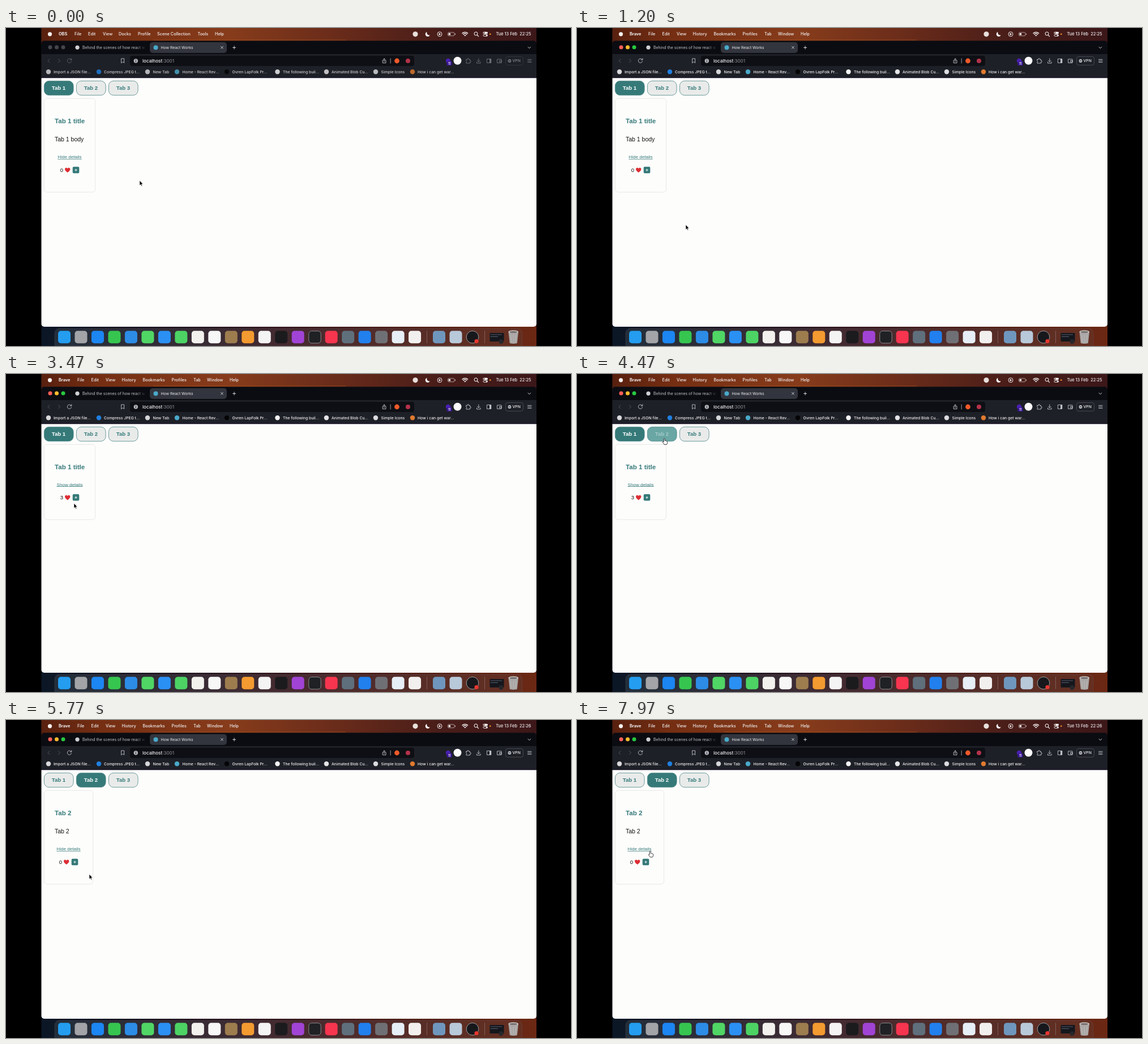
Write an HTML page that moves like this. It is 998 px wide and 561 px high and loops after 8000 ms.

```html
<!DOCTYPE html>
<html lang="en">
<head>
<meta charset="utf-8">
<title>How React Works</title>
<style>
  html, body { margin: 0; width: 100%; height: 100%; overflow: hidden; background: #000; }
  svg { display: block; width: 100vw; height: 100vh; }
  text { font-family: Inter, sans-serif; fill: #f1f1f3; white-space: pre; }
  .page text { font-family: "Liberation Sans", Arial, sans-serif; }
  .line { fill: none; stroke: #c3c5cc; stroke-width: .9; stroke-linecap: round; stroke-linejoin: round; }
</style>
</head>
<body>
<svg id="stage" viewBox="0 0 998 561">
  <defs>
    <linearGradient id="menuTint">
      <stop offset="0" stop-color="#58200f"/><stop offset=".12" stop-color="#752e12"/>
      <stop offset=".38" stop-color="#873c1b"/><stop offset=".6" stop-color="#692b1a"/>
      <stop offset=".8" stop-color="#491d19"/><stop offset="1" stop-color="#3c1719"/>
    </linearGradient>
    <linearGradient id="floorTint">
      <stop offset="0" stop-color="#0b1726"/><stop offset=".5" stop-color="#371a20"/>
      <stop offset="1" stop-color="#6c2813"/>
    </linearGradient>
    <linearGradient id="dockTint">
      <stop offset="0" stop-color="#222e3b"/><stop offset=".5" stop-color="#452a30"/>
      <stop offset="1" stop-color="#652f20"/>
    </linearGradient>
    <linearGradient id="tabFade">
      <stop offset="0" stop-color="#0b0c11" stop-opacity="0"/><stop offset="1" stop-color="#0b0c11"/>
    </linearGradient>
    <clipPath id="tabClip"><rect x="120" y="25" width="126" height="19"/></clipPath>
  </defs>
  <g id="desktop"></g>
  <g id="menu"></g>
  <g id="chrome"></g>
  <g id="page" class="page"></g>
  <g id="dock"></g>
  <g id="cursor"></g>
</svg>
<script>
const LOOP = 8000;
const TEAL = '#357a79';
const el = id => document.getElementById(id);

const rect = (x, y, w, h, fill, r = 0, extra = '') =>
  `<rect x="${x}" y="${y}" width="${w}" height="${h}" rx="${r}" fill="${fill}" ${extra}/>`;
const disc = (x, y, r, fill, extra = '') => `<circle cx="${x}" cy="${y}" r="${r}" fill="${fill}" ${extra}/>`;
const label = (x, y, size, str, extra = '') => `<text x="${x}" y="${y}" font-size="${size}" ${extra}>${str}</text>`;
const line = (d, extra = '') => `<path class="line" d="${d}" ${extra}/>`;

// Desktop, menu bar status icons and window body
el('desktop').innerHTML =
  rect(62.5, 0, 874.5, 561, 'url(#floorTint)') +
  rect(62.5, 0, 874.5, 30, 'url(#menuTint)') +
  rect(260, 20.6, 340, 1, '#a8571f', 0, 'opacity=".6"') +
  rect(62.5, 22.5, 874.5, 504.5, '#0b0c11', 5) +
  rect(62.5, 46, 874.5, 42, '#1e2027') +
  rect(62.5, 87, 874.5, 1.4, '#170f25') +
  '<path d="M62.5 88.3H937V522a5 5 0 0 1-5 5H67.5a5 5 0 0 1-5-5Z" fill="#fdfdfc"/>' +
  disc(77.5, 10.8, 3.6, '#f4f0ee') +
  disc(723, 10.8, 4.6, '#e8dfdc') +
  '<path d="M743.5 6.8a4.2 4.2 0 1 0 5.3 5.6a4.2 4.2 0 0 1-5.3-5.6Z" fill="#fff"/>' +
  disc(766, 10.8, 4, 'none', 'stroke="#fff" stroke-width=".9"') +
  '<path d="M764.7 8.7v4.2l3.5-2.1Z" fill="#fff"/>' +
  rect(780.5, 7.8, 11.5, 6, 'none', 1.8, 'stroke="#c9b9b6" stroke-width=".8"') +
  rect(781.7, 9, 3.4, 3.6, '#fff', .8) + rect(793, 9.6, 1, 2.4, '#c9b9b6') +
  line('M806 9.3a7 7 0 0 1 9.6 0M807.7 11.2a4.6 4.6 0 0 1 6.2 0M809.8 13.2h2', 'style="stroke:#fff;stroke-width:1.4"') +
  line('M832.3 12.3l2.3 2.5', 'style="stroke:#fff;stroke-width:1.1"') +
  disc(830, 10, 3, 'none', 'stroke="#fff"') +
  rect(842.5, 6.8, 8.5, 3.6, '#fff', 1.8) + disc(844.5, 8.6, 1.1, '#562118') +
  rect(842.9, 11.5, 7.7, 3, 'none', 1.5, 'stroke="#fff" stroke-width=".8"') + disc(849, 13, 1.1, '#fff') +
  disc(855.3, 10.8, 1.3, '#ff9a2c');

const MENUS = {
  OBS: [['OBS', 93], ['File', 121], ['Edit', 145], ['View', 171], ['Docks', 199], ['Profile', 233],
    ['Scene Collection', 267], ['Tools', 338.5], ['Help', 369]],
  Brave: [['Brave', 93], ['File', 126], ['Edit', 150.5], ['View', 176], ['History', 204.5], ['Bookmarks', 241.5],
    ['Profiles', 292.5], ['Tab', 331], ['Window', 355], ['Help', 395]],
};

function menuBar(app, clock) {
  return MENUS[app].map(([name, x], i) =>
    label(x, 13.4, 7.3, name, `font-weight="${i ? 500 : 700}"`)).join('') +
    label(927.5, 13.4, 7.4, `Tue 13 Feb\u00a0\u00a0${clock}`, 'text-anchor="end" font-weight="500"');
}

const BOOKMARKS = [
  [75, 84, '#d9d9dc', 'Import a JSON file...'], [164, 173, '#1f7fe0', 'Compress JPEG t...'],
  [250, 259.5, '#d5d6da', 'New Tab'], [302, 311.5, '#4aa9c9', 'Home - React Rev...'],
  [390, 399.5, '#050506', 'Ovren LapFolk Pr...'], [479.5, 489, '#f4f4f4', 'The following buil...'],
  [566, 575, '#e4e4e6', 'Animated Blob Cu...'], [653, 662.5, '#dcdce0', 'Simple Icons'],
  [718, 727, '#e07a2f', 'How i can get war...'],
];

function chrome(active) {
  const lights = active ? ['#ff5f57', '#febc2e', '#28c840'] : ['#45464c', '#45464c', '#45464c'];
  const dim = active ? 1 : .5;
  return lights.map((c, i) => disc(78 + i * 11.5, 34, 3.5, c)).join('') +
    // tabs
    disc(126, 34.3, 3.6, '#cfcfd3') +
    `<g clip-path="url(#tabClip)">${label(135, 36.9, 6.9, 'Behind the scenes of how react works', 'style="fill:#c4c6cc"')}</g>` +
    rect(230, 26, 17, 17, 'url(#tabFade)') +
    rect(254, 25, 136, 19, '#33353e', 5) + disc(264.5, 34.4, 4, '#4aa9c9') +
    label(273.5, 36.9, 6.8, 'How React Works') +
    line('M379.7 32.6l3.6 3.6m0-3.6l-3.6 3.6M400.6 34.5h5m-2.5-2.5v5M922 33.5l2.4 2.2 2.4-2.2', 'style="stroke:#e6e6ea"') +
    // navigation and address field
    line('M77 54.8l-3 3 3 3M92.5 54.8l3 3-3 3', 'style="stroke:#5b5d66"') +
    line('M115.3 56a3.7 3.7 0 1 0 .3 2.7M115.8 53.7v2.5h-2.5', `opacity="${active ? 1 : .4}"`) +
    rect(219, 49, 502, 18, '#0e0f14', 4) +
    line('M204 54h4.6v7.6l-2.3-2-2.3 2Z') +
    disc(229.3, 58, 3.7, '#b3b5bc') + rect(228.8, 57.3, 1, 2.9, '#15161b') + rect(228.8, 55.6, 1, 1, '#15161b') +
    label(241, 60.8, 8.1, '<tspan font-weight="500">localhost</tspan><tspan fill="#9698a1">:3001</tspan>') +
    line('M666.7 57h-1.5v4.7h5.8V57h-1.5M668.1 59.5v-5.5m-1.6 1.5l1.6-1.6 1.6 1.6') +
    rect(678.7, 53.5, .9, 9, '#a6a8b0') + disc(690.5, 58, 4.4, '#f05a2a') + disc(710, 58, 4, '#b3324a') +
    // extensions and tools
    disc(781, 58, 4.2, '#4a20b4') + rect(778.5, 58.6, 9, 7.4, '#3b1896', 1.5) +
    label(783, 64.6, 5.6, '11', 'text-anchor="middle" font-weight="600"') +
    disc(797.5, 57.8, 7, '#fbfbfb') +
    `<g opacity="${dim}">` +
    line('M813 55.5h2a1.3 1.3 0 1 1 2.4 0h2v2.2a1.3 1.3 0 1 1 0 2.4v2h-6.4v-2.2a1.2 1.2 0 0 0 0-2.3Z') +
    line('M834.8 54v5.5m-2.2-2l2.2 2.2 2.2-2.2M831.5 60v2h6.6v-2') +
    line('M849.8 54.5h7v7h-7ZM854.5 54.5v7') + rect(854.3, 54.5, 2.5, 7, '#c3c5cc') +
    line('M868 55h7v6.5h-7ZM872 57.5h3.5v2.4H872Z') +
    rect(882.5, 50.5, 31, 15, 'none', 3.5, 'stroke="#50525c" stroke-width=".8"') +
    disc(889.5, 58, 2.9, '#c3c5cc') + rect(887.8, 57.4, 3.4, 1.1, '#1e2027') +
    label(894.5, 60.4, 6.8, 'VPN', 'font-weight="500"') +
    line('M921.5 55.5h6.5M921.5 58h6.5M921.5 60.5h6.5') + '</g>' +
    // bookmarks
    `<g opacity="${active ? 1 : .82}">` +
    BOOKMARKS.map(([ix, x, color, name]) =>
      disc(ix, 77.2, 4.2, color) + label(x, 79.7, 6.85, name, 'font-weight="500"')).join('') + '</g>';
}

// Dock
const DOCK = ['#249df0', '#a3a4a8', '#1c86f2', '#36c650', '#2c8ce6', '#50d665', '#2b90f4', '#4cd364', '#f3f1ee',
  '#f7f7f7', '#9d7d4e', '#f39a30', '#f4f4f4', '#1b1b1e', '#a144d6', '#202124', '#f7354f', '#5f6f7c', '#2180ee',
  '#6f7075', '#e7eff6', '#f2f0ee'];
const appIcon = (x, color) => rect(x - 11, 534.3, 22, 22, color, 5);
el('dock').innerHTML =
  rect(86, 530.3, 826, 36, 'url(#dockTint)', 8, 'stroke="#6b5a60" stroke-opacity=".45" stroke-width=".7"') +
  DOCK.map((c, i) => appIcon(103 + i * 29.48, c)).join('') +
  rect(534.8, 534.6, 21.4, 21.4, 'none', 5, 'stroke="#9a9a9d" stroke-width=".9"') +
  rect(743, 534, .8, 22, '#86696a') + rect(845.2, 534, .8, 22, '#86696a') +
  appIcon(765, '#6f97bd') + appIcon(794.5, '#b8c9da') +
  disc(824, 545.2, 10.8, '#17181c', 'stroke="#b9b9bd" stroke-width=".8"') + disc(831, 552.5, 3.6, '#e8372f') +
  rect(854.5, 538, 25, 15, '#15171d', 1) + rect(856, 540, 20, 2, '#343843') + rect(856, 544, 13, 1, '#596070') +
  disc(874.5, 553, 4, '#26272c') +
  '<path d="M887.5 536h17.5l-2.2 20q-6.5 2-13 0Z" fill="#a9a6a5"/>' +
  '<ellipse cx="896.2" cy="536" rx="8.8" ry="2.8" fill="#d6d3d1"/><ellipse cx="896.2" cy="536.3" rx="7" ry="1.9" fill="#77716f"/>' +
  line('M891.5 541l1.2 13M896.2 541.5v13M901 541l-1.2 13', 'style="stroke:#c9c5c3;stroke-width:.7"');

// Web page
const TAB_X = [67, 124, 181];
function tabButton(i, selected, hovered) {
  const on = i === selected;
  const fill = on ? TEAL : hovered ? '#69a6a4' : '#e9ebea';
  const ink = on ? '#fff' : hovered ? '#a4cac7' : TEAL;
  return rect(TAB_X[i] + .4, 93.4, 51.7, 25.2, fill, 8.5, 'stroke="#4b8483" stroke-width=".8"') +
    label(TAB_X[i] + 26, 109.3, 9.6, `Tab ${i + 1}`, `text-anchor="middle" font-weight="700" style="fill:${ink}"`);
}

function pageView({ tab, likes, open, hover }) {
  const width = tab ? 87 : 91;
  const mid = 67 + width / 2;
  const lift = open ? 0 : 32.7;
  const title = tab ? 'Tab 2' : 'Tab 1 title';
  const body = tab ? 'Tab 2' : 'Tab 1 body';
  const linkWidth = open ? 42.4 : 46;
  const y = 250.5 - lift;
  return TAB_X.map((_, i) => tabButton(i, tab, hover === i)).join('') +
    rect(67.4, 124.4, width - .8, 165.2 - lift, '#fdfdfc', 5, 'stroke="#e2e4e0" stroke-width=".8"') +
    label(86, 168.3, 11.6, title, `font-weight="700" style="fill:${TEAL}"`) +
    (open ? label(86, 200.4, 10.5, body, 'style="fill:#111"') : '') +
    label(mid, 230.2 - lift, 8.1, open ? 'Hide details' : 'Show details', `text-anchor="middle" style="fill:${TEAL}"`) +
    rect(mid - linkWidth / 2, 231 - lift, linkWidth, .7, TEAL) +
    label(mid - 16.7, y + 3.4, 9.4, likes, 'style="fill:#111"') +
    `<path transform="translate(${mid - 3.8} ${y})" d="M0 4.6C-2.5 2.6-4.7.8-4.7-1.5C-4.7-4.4-1.3-4.9 0-2.5C1.3-4.9 4.7-4.4 4.7-1.5C4.7.8 2.5 2.6 0 4.6Z" fill="#dd2e33"/>` +
    rect(mid + 5.2, y - 5.8, 11.6, 11.6, TEAL, 2) +
    `<path d="M${mid + 8.8} ${y + .1}h4.4m-2.2-2.2v4.4" stroke="#fff" stroke-width=".9"/>`;
}

// Pointer: time, x, y
const PATH = [[0, 236, 269], [350, 236, 269], [1000, 192, 347], [1250, 192, 347], [1950, 126.5, 249], [2800, 126.5, 249],
  [3200, 120, 228], [3600, 120, 228], [4250, 154, 114], [4750, 154, 114], [5450, 147, 272], [5900, 147, 272],
  [6700, 125.5, 242], [7100, 125.5, 242], [7650, 129, 231.5], [LOOP, 129, 231.5]];

function pointerAt(t) {
  const i = PATH.findIndex(p => p[0] > t);
  const [t0, x0, y0] = PATH[i - 1], [t1, x1, y1] = PATH[i];
  const k = (t - t0) / (t1 - t0), e = k * k * (3 - 2 * k);
  return [x0 + (x1 - x0) * e, y0 + (y1 - y0) * e];
}

function hoverAt(x, y, tab, open) {
  const i = TAB_X.findIndex(left => x > left && x < left + 52 && y > 93 && y < 119);
  if (i >= 0) return i;
  const mid = tab ? 110.5 : 112.5, lift = open ? 0 : 32.7;
  if (Math.abs(x - mid) < 22 && Math.abs(y - 228 + lift) < 5) return 'link';
  if (Math.abs(x - mid - 11) < 7 && Math.abs(y - 250.5 + lift) < 10) return 'plus';
  return null;
}

const ARROW = '<path d="M0 0V8.7L2 6.9L3.4 9.9L4.7 9.3L3.4 6.4H6Z" fill="#000" stroke="#fff" stroke-width=".6"/>';
const HAND = '<path d="M-.8 5.7V.8Q-.8-.4.2-.4Q1.1-.4 1.2.8V3.6Q2.2 3 2.8 4Q3.8 3.5 4.3 4.5Q5.5 4.2 5.5 5.6V7.5Q5.4 9 4.5 10.4H.2Q-.8 9-2.3 7Q-3 5.8-2.3 5.4Q-1.6 5.1-.8 6.1Z" fill="#fff" stroke="#111" stroke-width=".8"/>';

// Rewrites a group only when its markup changes
const shown = {};
function show(id, html) {
  if (shown[id] !== html) el(id).innerHTML = shown[id] = html;
}

function draw(now) {
  const t = Math.max(0, now) % LOOP;
  const active = t >= 800;
  const tab = t < 4750 ? 0 : 1;
  const open = t < 3400 || tab === 1;
  const likes = tab ? 0 : [2150, 2450, 2700].filter(click => t >= click).length;
  const [x, y] = pointerAt(t);
  const hover = active ? hoverAt(x, y, tab, open) : null;
  show('menu', menuBar(active ? 'Brave' : 'OBS', t < 5100 ? '22:25' : '22:26'));
  show('chrome', chrome(active));
  show('page', pageView({ tab, likes, open, hover }));
  show('cursor', hover === null ? ARROW : HAND);
  el('cursor').setAttribute('transform', `translate(${x} ${y})`);
  requestAnimationFrame(time => draw(time - start));
}

const start = performance.now();
draw(0);
</script>
</body>
</html>
```
